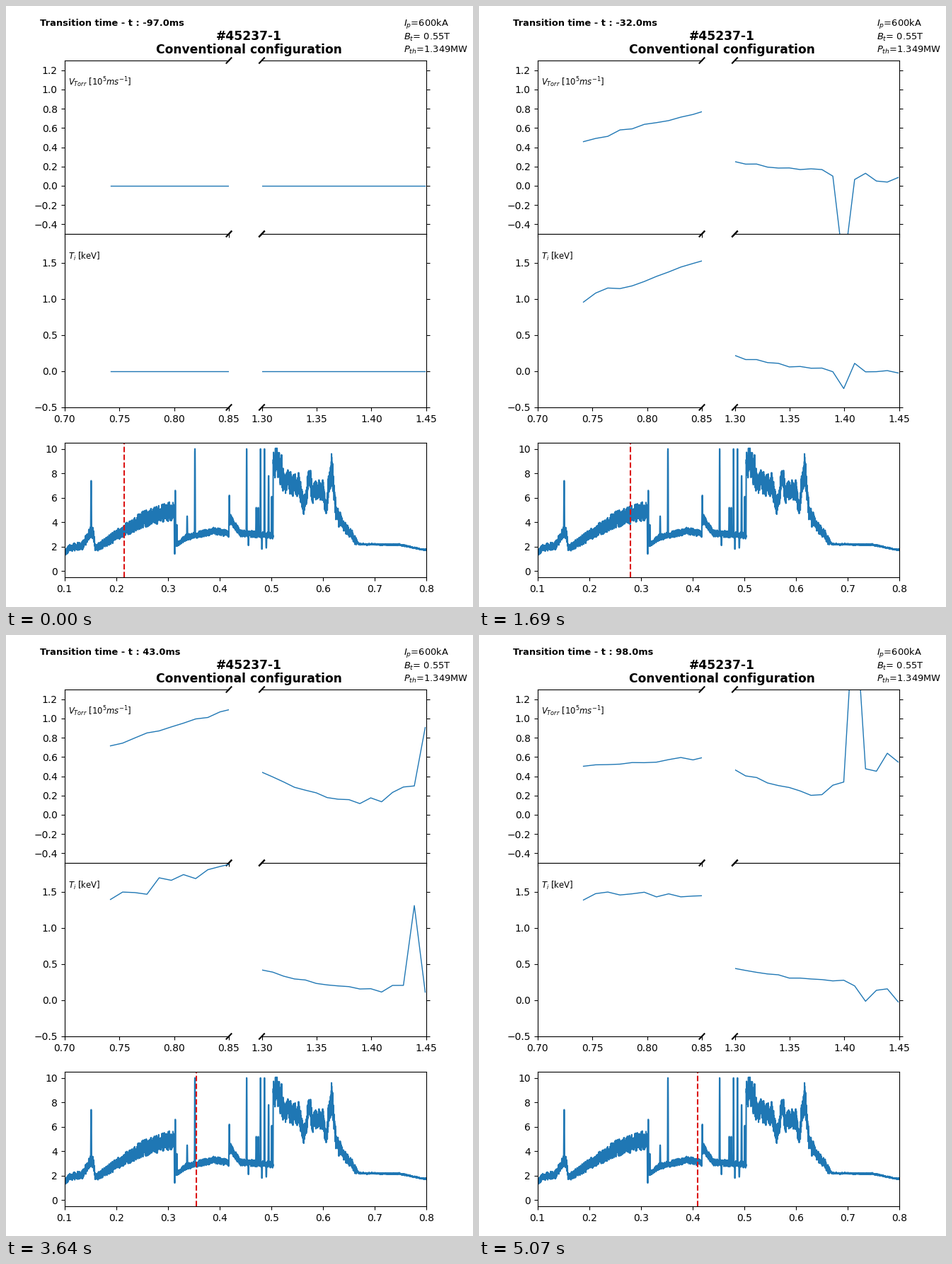
Write a matplotlib script that moves like this. It is 660x849 px and loops after 5200 ms.

```python
import numpy as np
import matplotlib.pyplot as plt
from matplotlib.animation import FuncAnimation

W, H, DPI = 660, 849, 100
FRAMES, STEP = 40, 130
BLUE, RED = "#1f77b4", "#dc1414"

plt.rcParams["font.family"] = "DejaVu Sans"
rng = np.random.default_rng(7)
fig = plt.figure(figsize=(W / DPI, H / DPI), dpi=DPI, facecolor="white")

R_IN = np.linspace(.742, .853, 11)
R_OUT = np.linspace(1.30, 1.449, 16)
R_MID = 1.38
STEPS = np.arange(FRAMES)
KEYS = (1, 9, 18, 24, 32, 39)


def keyed(levels):
    """A level that glides between key steps, as a column over time."""
    return np.interp(STEPS, KEYS, levels)[:, None]


def inner(core, cut, jitter):
    """Straight profile from the core to the axis cut."""
    s = (R_IN - R_IN[0]) / np.ptp(R_IN)
    out = keyed(core) * (1 - s) + keyed(cut) * s
    out += rng.normal(0, jitter, out.shape)
    out[0] = 0
    return out


def outer(cut, mid, rim, jitter, bursts):
    """Decay to R_MID, then a noisy rim where one burst at a time stands out."""
    s = np.clip((R_OUT - 1.30) / (R_MID - 1.30), 0, 1)
    u = np.clip((R_OUT - R_MID) / (1.45 - R_MID), 0, 1)
    out = keyed(mid) + (keyed(cut) - keyed(mid)) * (1 - s) ** 1.5
    out += (keyed(rim) - keyed(mid)) * u
    out += rng.normal(0, jitter, out.shape) * (1 + 3 * (u > 0))
    start, r, height = np.array(bursts).T
    now = np.maximum(np.searchsorted(start, STEPS, "right") - 1, 0)
    out += height[now, None] * np.exp(-((R_OUT - r[now, None]) / .005) ** 2)
    out[0] = 0
    return out


def add_axes(x0, y0, x1, y1):
    return fig.add_axes([x0 / W, 1 - y1 / H, (x1 - x0) / W, (y1 - y0) / H])


def broken_panel(y0, y1, ylim, yticks, show_x):
    """Two axes side by side with diagonal cut marks between them."""
    sides = ((82.5, 315, (.70, .85), [.70, .75, .80, .85], "right", 1),
             (361.5, 594, (1.30, 1.45), [1.30, 1.35, 1.40, 1.45], "left", 0))
    pair, d = [], .015
    for x0, x1, xlim, xticks, cut, cx in sides:
        ax = add_axes(x0, y0, x1, y1)
        ax.spines[cut].set_visible(False)
        ax.set(xlim=xlim, ylim=ylim, xticks=xticks, yticks=yticks)
        ax.tick_params(axis="x", labelbottom=show_x)
        if cut == "left":
            ax.tick_params(axis="y", left=False, labelleft=False, right=True)
        for cy in (0, 1):
            ax.plot([cx - d, cx + d], [cy - d, cy + d], color="k", lw=1.5,
                    transform=ax.transAxes, clip_on=False)
        pair.append(ax)
    return pair


def trace():
    """Signal: a mean curve, noise in proportion to it, and narrow spikes."""
    mean = np.array([
        (.1, 1.4), (.11, 1.9), (.135, 2.1), (.15, 3.1), (.156, 3.1), (.16, 1.85),
        (.2, 2.9), (.25, 4.2), (.3125, 5.0), (.3128, 2.0), (.335, 2.75), (.39, 3.3),
        (.418, 3.05), (.421, 4.3), (.44, 3.1), (.5035, 2.9), (.504, 9), (.514, 9),
        (.522, 7.6), (.555, 6.8), (.563, 5.3), (.573, 7.5), (.58, 6.5), (.6, 6.6),
        (.606, 5.3), (.6165, 8.5), (.625, 4.9), (.645, 3.5), (.67, 2.2), (.75, 2.15),
        (.8, 1.72)])
    spikes = [(.1518, 7.4), (.3135, 1.4), (.3145, 6.6), (.3175, 3.8), (.3375, 4.5),
              (.3525, 10), (.419, 6.2), (.4525, 10), (.456, 2.1), (.471, 5.2),
              (.475, 5.2), (.4793, 10), (.482, 1.8), (.487, 10), (.4905, 1.9),
              (.495, 7.8), (.501, 6.1)]
    t = np.linspace(.1, .8, 7000)
    y = np.interp(t, *mean.T)
    half = y * np.select([t < .3127, t < .504, t < .665], [.16, .09, .13], .025)
    fast = np.clip(rng.normal(0, .45, t.size), -1, 1)
    slow = np.convolve(rng.normal(0, 1, t.size), np.ones(25) / 5, "same")
    y += half * (fast + .25 * slow * (t > .504))
    for c, top in spikes:
        y += (top - y) * np.exp(-((t - c) / .0006) ** 4)
    return t, np.minimum(y, 10.05)


def label(x, y, s, **kw):
    return fig.text(x / W, 1 - y / H, s, va="baseline", **kw)


clock = label(48, 28, "", fontsize=9.4, weight="bold")
for y, s in ((48, "#45237-1"), (67, "Conventional configuration")):
    label(343, y, s, fontsize=12.3, weight="bold", ha="center")
for y, s in ((29, "$I_p$=600kA"), (48, "$B_t$= 0.55T"), (66, "$P_{th}$=1.349MW")):
    label(561.5, y, s, fontsize=9.35)
label(87.5, 112, "$V_{Torr}$ $[10^5 ms^{-1}]$", fontsize=8.4)
label(87.5, 358, "$T_i$ [keV]", fontsize=8.4)

v_axes = broken_panel(77, 322, (-.5, 1.3), np.arange(-4, 13, 2) / 10, False)
t_axes = broken_panel(322, 567, (-.5, 1.9), np.arange(-1, 4) / 2, True)

velocity = (
    inner(core=(.34, .34, .63, .68, .76, .51),
          cut=(.30, .49, 1.14, 1.18, 1.04, .60), jitter=.014),
    outer(cut=(.16, .225, .26, .32, .57, .475),
          mid=(.12, .17, .16, .14, .16, .20),
          rim=(0, 0, .08, .08, .35, .65), jitter=.01,
          bursts=[(1, 1.40, .3), (11, 1.40, -1.0), (21, 1.449, .7),
                  (29, 1.429, -.35), (36, 1.409, 1.9)]))
temperature = (
    inner(core=(.60, .81, 1.26, 1.43, 1.44, 1.43),
          cut=(.85, 1.20, 1.87, 1.93, 1.74, 1.47), jitter=.035),
    outer(cut=(.13, .185, .26, .35, .52, .45),
          mid=(.04, .04, .03, .15, .21, .28),
          rim=(.02, .03, 0, .1, .1, .05), jitter=.01,
          bursts=[(1, 1.40, -.25), (16, 1.409, 3.4), (21, 1.438, 1.3),
                  (29, 1.422, 1.5), (36, 1.419, -.2)]))

curves = []
for axes, values in ((v_axes, velocity), (t_axes, temperature)):
    for ax, r, v in zip(axes, (R_IN, R_OUT), values):
        line, = ax.plot(r, v[0], color=BLUE, lw=1)
        curves.append((line, v))

signal = add_axes(82.5, 617, 594, 807)
signal.plot(*trace(), color=BLUE, lw=1.5)
signal.set(xlim=(.1, .8), ylim=(-.5, 10.5), yticks=range(0, 11, 2))
cursor = signal.axvline(.215, color=RED, ls="--", lw=1.5)


def update(i):
    t = -97 + 5 * i
    clock.set_text(f"Transition time - t : {t:.1f}ms")
    cursor.set_xdata([.312 + t / 1000] * 2)
    for line, values in curves:
        line.set_ydata(values[i])
    return [clock, cursor] + [line for line, _ in curves]


anim = FuncAnimation(fig, update, frames=FRAMES, interval=STEP, repeat=True)
plt.show()
```
